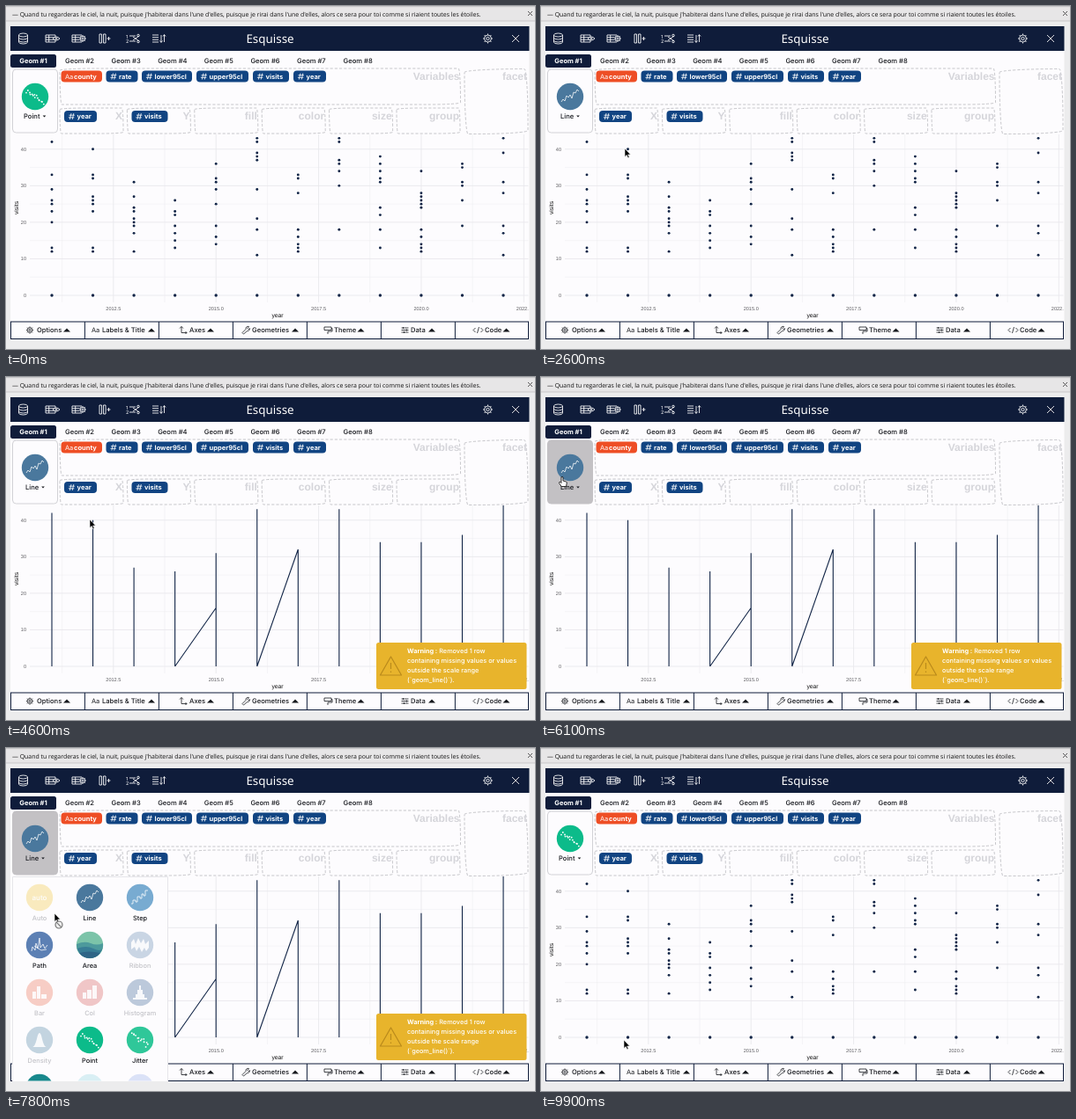
Animation, 600 px wide and 390 px high, one loop 10 s. Source, as an HTML page:

```html
<!DOCTYPE html>
<html lang="fr">
<head>
<meta charset="utf-8">
<title>Esquisse</title>
<style>
  html, body { margin: 0; width: 100%; height: 100%; overflow: hidden; background: #ececec; }
  svg { display: block; width: 600px; height: 390px; font-family: Inter, "Open Sans", sans-serif; }
  .plot { font-family: "Liberation Sans", Arial, sans-serif; }
</style>
</head>
<body>
<svg id="stage" viewBox="0 0 600 390" text-rendering="geometricPrecision"></svg>
<script>
const NAVY = '#0f1c3a', INK = '#112446';
const stage = document.getElementById('stage');

const text = (x, y, s, size = 7.6, attrs = '') => `<text x="${x}" y="${y}" font-size="${size}" ${attrs}>${s}</text>`;
const rect = (x, y, w, h, attrs) => `<rect x="${x}" y="${y}" width="${w}" height="${h}" ${attrs}/>`;
const path = (d, attrs = '') => `<path d="${d}" ${attrs}/>`;
const circle = (x, y, r, attrs = '') => `<circle cx="${x}" cy="${y}" r="${r}" ${attrs}/>`;
const group = (content, attrs = '') => `<g ${attrs}>${content}</g>`;
const at = (x, y, content, attrs = '') => group(content, `transform="translate(${x} ${y})" ${attrs}`);
const range = (n, f) => Array.from({ length: n }, (_, i) => f(i)).join('');

// Window frame
function windowFrame() {
  return rect(0, 0, 600, 390, 'fill="#ececed"') +
    rect(0, 0, 600, 17, 'fill="#e7e6e7"') +
    rect(0, 0, 600, 1.2, 'fill="#c5c5c8"') +
    rect(0, 16.5, 600, 1, 'fill="#c9c8ca"') +
    text(7, 11.6, "— Quand tu regarderas le ciel, la nuit, puisque j'habiterai dans l'une d'elles, puisque je rirai dans l'une d'elles, alors ce sera pour toi comme si riaient toutes les étoiles.",
      6.93, 'fill="#111" font-family="Open Sans, sans-serif"') +
    path('M592 6l5 5m0-5l-5 5', 'stroke="#555" stroke-width="1"') +
    rect(5, 23, 588.5, 356, 'fill="#fdfcfe"');
}

// Header
const gear = r => circle(0, 0, r * .72) + circle(0, 0, r * .3) +
  range(8, i => path(`M0 ${-r * .72}V${-r}`, `transform="rotate(${i * 45})"`));
const table = path('M-7-4H4V4H-7ZM-7-1.3H4M-7 1.3H4M-3.3-4V4');

function header() {
  const icons = [
    [19.5, path('M-5-4A5 2 0 0 1 5-4V4A5 2 0 0 1-5 4ZM-5-4A5 2 0 0 0 5-4M-5-1A5 2 0 0 0 5-1M-5 2A5 2 0 0 0 5 2')],
    [52, table + path('M1 0Q5-4 9 0Q5 4 1 0Z', `fill="${NAVY}"`) + circle(5, 0, 1)],
    [82, table + at(5, 0, circle(0, 0, 3.6, `fill="${NAVY}" stroke="none"`) + gear(3.8))],
    [111, path('M-5-5H-2.5V5H-5ZM-.5-5H2V5H-.5ZM3.5 0H7.5M5.5-2V2')],
    [144, text(-8, -.5, '1', 5.5, 'fill="#fff" stroke="none"') + text(-8, 5, '2', 5.5, 'fill="#fff" stroke="none"') +
      path('M-4-3H3M-4 3H3M0-2L7 3M0 2L7-3') + circle(6, -3.5, 1.3) + circle(6, 3.5, 1.3)],
    [173, path('M-7-4H0M-7-1.3H0M-7 1.3H0M-7 4H0M3-4V4M1.5 2.5L3 4.5 4.5 2.5M6.5 4V-4M5-2.5L6.5-4.5 8-2.5')],
    [546.5, gear(5.5)],
    [578, path('M-4-4L4 4M4-4L-4 4')]
  ];
  return rect(5, 23, 588.5, 28, `fill="${NAVY}"`) +
    group(icons.map(([x, art]) => at(x, 37, art)).join(''), 'fill="none" stroke="#fff" stroke-width=".85"') +
    text(299.5, 42, 'Esquisse', 13.4, 'fill="#fff" text-anchor="middle" font-family="Noto Sans, sans-serif"');
}

function tabs() {
  return rect(5, 55, 52, 15, `rx="2.5" fill="${NAVY}"`) +
    text(31, 65.2, 'Geom #1', 7.5, 'fill="#fff" font-weight="700" text-anchor="middle"') +
    range(7, i => text(67 + i * 52.6, 65.2, `Geom #${i + 2}`, 7.6, 'fill="#16181d" font-weight="500"'));
}

// Drop zones with a hand-drawn outline
function zone(x, y, w, h, label) {
  const k = Math.min(w, h) / 270, a = 255 * k, b = 15 * k, c = 225 * k;
  const d = `M${x} ${y + b}A${a} ${b} 0 0 1 ${x + a} ${y}H${x + w - b}A${b} ${c} 0 0 1 ${x + w} ${y + c}` +
    `V${y + h - b}A${c} ${b} 0 0 1 ${x + w - c} ${y + h}H${x + b}A${b} ${a} 0 0 1 ${x} ${y + h - a}Z`;
  return path(d, 'fill="none" stroke="#c6c6ca" stroke-width="1" stroke-dasharray="3.2 2"') +
    text(x + w - 1, y + 12.6, label, 12, 'fill="#d5d5da" font-weight="700" text-anchor="end" font-family="Liberation Sans, sans-serif"');
}

function chip(x, y, w, label, isText) {
  const mark = isText ? text(x + 4.5, y + 9.2, 'Aa', 7.4, 'fill="#fff"') :
    path(`M${x + 8} ${y + 3}l-1.6 7m4.4-7l-1.6 7m-3.7-4.8h6.4m-7 2.6h6.4`, 'stroke="#fff" stroke-width=".8" fill="none"');
  return rect(x, y, w, 13, `rx="4" fill="${isText ? '#ee4e25' : '#114482'}"`) + mark +
    text(x + 14.6, y + 9.2, label, 7.5, 'fill="#fff" font-weight="700"');
}

function dropZones() {
  const slots = ['X', 'Y', 'fill', 'color', 'size', 'group'];
  return zone(61, 71, 454.5, 41, 'Variables') + zone(520, 71.5, 72, 74, 'facet') +
    slots.map((s, i) => zone(61 + i * 76.4, 116, 72, 29, s)).join('') +
    chip(62.5, 73.5, 46.5, 'county', true) + chip(113.5, 73.5, 36, 'rate') + chip(154, 73.5, 57, 'lower95cl') +
    chip(216, 73.5, 59, 'upper95cl') + chip(280, 73.5, 41, 'visits') + chip(326, 73.5, 37, 'year') +
    chip(66, 119, 37, 'year') + chip(142.5, 119, 41, 'visits');
}

// Chart
const px = year => 52 + (year - 2011) * 46.55;
const py = visits => 329 - visits * 4.155;
const visitsByYear = [
  '42 33 29 26 25 23 20 13 12', '40 33 32 27 26 25 23 13 12', '31 27 24 23 21 20 19 17 12',
  '26 23 22 19 17 15 13', '36 32 31 29 25 19 16 14', '43 42 39 38 37 29 21 18 11',
  '33 32 28 18 16 14 13 12', '43 42 37 36 34 30 18', '38 36 34 32 31 24 22 18 13',
  '34 28 27 26 25 24 18 16 14 13 12', '36 35 31 30 26 19', '43 39 31 28 19 17 11'
];
const lineTops = [42, 40, 27, 26, 31, 43, 32, 43, 34, 34, 36, 45];

function axes() {
  const vertical = (x, w) => path(`M${x} 146V337`, `stroke-width="${w}"`);
  const horizontal = (y, w) => path(`M27 ${y}H592.5`, `stroke-width="${w}"`);
  const grid = range(5, i => vertical(px(2012.5 + 2.5 * i), .9) + vertical(px(2011.25 + 2.5 * i), .45)) +
    range(5, i => horizontal(py(i * 10), .9) + (i < 4 ? horizontal(py(i * 10 + 5), .45) : ''));
  return group(grid, 'stroke="#e9e8ec"') +
    range(5, i => text(23, py(i * 10) + 2, i * 10, 5.6, 'fill="#5c5c60" text-anchor="end"')) +
    range(5, i => text(px(2012.5 + 2.5 * i), 345.8, (2012.5 + 2.5 * i).toFixed(1), 5.6, 'fill="#5c5c60" text-anchor="middle"')) +
    text(308, 353.8, 'year', 6.8, 'fill="#111" text-anchor="middle"') +
    text(0, 0, 'visits', 6.8, 'fill="#111" text-anchor="middle" transform="translate(14 229.5) rotate(-90)"');
}

const points = () => visitsByYear.map((row, i) =>
  row.split(' ').map(v => circle(px(2011 + i), py(v), 1.45)).join('') + circle(px(2011 + i), py(0), 1.7)).join('');

const lines = () => path(
  lineTops.map((top, i) => `M${px(2011 + i)} ${py(0)}V${py(top)}`).join('') +
  `M${px(2014)} ${py(0)}L${px(2015)} ${py(16)}M${px(2016)} ${py(0)}L${px(2017)} ${py(32)}`,
  `fill="none" stroke="${INK}" stroke-width="1.1"`);

// Bottom bar
function bottomBar() {
  const buttons = [
    [27, 35, 69, 'Options', gear(4)],
    [102, 109, 165, 'Labels &amp; Title', text(-5, 2.6, 'Aa', 7.4, 'fill="#16181d" stroke="none"')],
    [201, 208, 232, 'Axes', path('M-2-4V3H4M-4-2L-2-4 0-2M2.5 1.5L4 3 2.5 4.5')],
    [272, 279, 328, 'Geometries', path('M-4 3L0-1A2.6 2.6 0 0 1 3.5-4L2-2 3.2-.8 4.5-2A2.6 2.6 0 0 1 1.5 1L-2.5 4.5Z')],
    [365, 372, 402.5, 'Theme', path('M-4-3.5H4V0H-4ZM4-2H5V1.5H0V4.5')],
    [452.5, 459, 483, 'Data', path('M-4-2.5H4M-4 0H4M-4 2.5H4M-2-3.5V-1.5M2-1V1M-1 1.5V3.5')],
    [535.5, 543, 567.5, 'Code', path('M-3-2.5L-5.5 0-3 2.5M3-2.5L5.5 0 3 2.5M1-3.5L-1 3.5')]
  ];
  return rect(5.5, 359, 587, 19.5, `fill="#fdfcfe" stroke="${NAVY}"`) +
    range(6, i => path(`M${89.4 + i * 84} 359V378.5`, `stroke="${NAVY}"`)) +
    buttons.map(([icon, label, caret, name, art]) =>
      at(icon, 368.5, art, 'fill="none" stroke="#16181d" stroke-width=".8"') +
      text(label, 371.2, name, 7.6, 'fill="#16181d" font-weight="500"') +
      path(`M${caret - 4} 370.5l4-4 4 4Z`, 'fill="#16181d"')).join('');
}

// Geom icons, drawn around their centre
let seed = 7;
const random = () => (seed = seed * 16807 % 2147483647) / 2147483647;
const stroke = d => path(d, 'fill="none" stroke="#fff" stroke-width=".9" opacity=".85"');
const solid = d => path(d, 'fill="#fff" opacity=".9"');
const scatter = (n, spread) => range(n, i => {
  const u = i / (n - 1) * 2 - 1;
  return circle(u * 9 + (random() - .5) * 2, u * 6.5 + (random() - .5) * spread, .9, 'fill="#fff"');
});
const bell = solid('M-8 8C-3 7-3-8 0-8S3 7 8 8Z');
const zigzag = 'M-10 6L-8 3-6 5-4-1-2 1 0-2 2 2 4-5 6-4 8-8 10-6';
const geoms = [
  ['Auto', '#f3cd4e', text(0, 2.6, 'auto', 8, 'fill="#fff" text-anchor="middle" font-weight="500"'), false],
  ['Line', '#4a789d', stroke(zigzag), true],
  ['Step', '#78abd1', stroke('M-10 7H-8V3H-5V5H-3V-1H0V1H2V-4H4V-2H6V-8H9'), true],
  ['Path', '#5c80b4', stroke('M-9 7L-8 2-5 6-4-2-2 4 0-8 1 3 4-1 6 4 9 0M-6 1L2 6 8 5'), true],
  ['Area', '#7cc4a9', path('M-15-1Q-6-5 1-2T14.9-2A15 15 0 0 1-14.9 2Z', 'fill="#4d9a9c"') +
    path('M-14.5 4Q-4 0 4 4T14.3 4A15 15 0 0 1-14.3 4Z', 'fill="#387d95"') +
    path('M-12 9Q-2 6 12 9A15 15 0 0 1-12 9Z', 'fill="#2f6586"'), true],
  ['Ribbon', '#6f91b8', solid('M-10-3L-7-7-5-1-2-8 1-2 4-7 6-1 10-5V3L7 7 5 3 2 8-1 2-4 7-6 2-10 5Z'), false],
  ['Bar', '#ee7d62', solid('M-8 7V-1H-4V7ZM-3 7V-7H1V7ZM2 7V2H8V7Z'), false],
  ['Col', '#da6a67', solid('M-8 7V0H-4V7ZM-3 7V-3H2V7ZM3 7V-8H8V7Z'), false],
  ['Histogram', '#4b719f', solid('M-8 8V6H-5V2H-3V-3H-1V-8H1V-3H3V2H5V6H8V8Z'), false],
  ['Density', '#5f8fae', bell, false],
  ['Point', '#0cbb8a', scatter(15, 5), true],
  ['Jitter', '#2fc799', scatter(14, 8), true],
  ['', '#18888c', '', true],
  ['', '#d9eff4', '', true],
  ['', '#dbe2f7', '', true]
];
const icon = ([, color, art]) => circle(0, 0, 15.2, `fill="${color}"`) + art;
const geomNamed = name => geoms.find(g => g[0] === name);

function menu() {
  const cells = geoms.map((g, i) => {
    const x = 38 + i % 3 * 57, y = 170 + Math.floor(i / 3) * 54;
    return at(x, y, icon(g), g[3] ? '' : 'opacity=".36"') +
      text(x, y + 26.2, g[0], 7.4, `text-anchor="middle" font-weight="500" fill="${g[3] ? '#16181d' : '#c3c3c8'}"`);
  }).join('');
  return rect(7, 146, 177, 233, 'fill="#fdfcfe"') +
    path('M7.5 379V146.5H183.5V379', 'fill="none" stroke="#e6e6ea"') + group(cells, 'clip-path="url(#menuClip)"');
}

const geomButton = (name, labelX, caretX) => at(33, 103, icon(geomNamed(name))) +
  text(labelX, 127.8, name, 7.6, 'fill="#16181d" font-weight="500"') +
  path(`M${caretX - 1.8} 124.4h3.6l-1.8 2Z`, 'fill="#16181d"');

function warning() {
  const rows = ['containing missing values or values', 'outside the scale range', '(`geom_line()`).'];
  return rect(420, 302, 170.5, 53, 'rx="2.5" fill="#e8b42c"') +
    path('M436.500 318L448.500 339H424.500ZM436.500 325V332M436.500 334.500V336', 'fill="none" stroke="#b98a1c" stroke-width="1.2" stroke-linejoin="round"') +
    group(text(455, 314.4, '<tspan font-weight="700">Warning :</tspan> Removed 1 row', 7.3) +
      rows.map((r, i) => text(455, 325.4 + i * 11, r, 7.3)).join(''), 'fill="#fff" font-weight="500"');
}

const arrow = path('M0 0V9.500L2.200 7.500 3.700 10.800 5.200 10.100 3.700 7H6.600Z', 'fill="#000" stroke="#fff" stroke-width=".6"');
const hand = path('M-1 0Q0-1.200 1 0V4L4.500 5Q5.500 5.500 5.200 7L4.500 10.500H-.8L-3.500 6.500Q-3.500 5-2 5.500L-1 6.500Z',
  'fill="#fff" stroke="#000" stroke-width=".8" stroke-linejoin="round"');
const forbidden = circle(5, 13, 4, 'fill="#eee" stroke="#777" stroke-width="1.200"') + path('M2.200 10.200l5.600 5.600', 'stroke="#777" stroke-width="1.200"');

stage.innerHTML =
  `<defs><clipPath id="panel">${rect(27, 146, 566, 192, '')}</clipPath>` +
  `<clipPath id="app">${rect(5, 23, 588, 356, '')}</clipPath>` +
  `<clipPath id="menuClip">${rect(7, 146, 177, 232.5, '')}</clipPath></defs>` +
  windowFrame() + header() + tabs() + dropZones() +
  group(axes(), 'class="plot" clip-path="url(#app)"') +
  group(points(), `id="points" fill="${INK}" clip-path="url(#panel)"`) +
  group(lines(), 'id="lines" clip-path="url(#panel)"') +
  bottomBar() +
  rect(7.5, 72, 51, 72, 'id="button" rx="4"') +
  group(geomButton('Point', 20, 43.5), 'id="pointButton"') +
  group(geomButton('Line', 22, 42), 'id="lineButton"') +
  group(menu(), 'id="menu"') + group(warning(), 'id="warning"') +
  group(group(arrow, 'id="arrow"') + group(hand, 'id="hand"') + group(forbidden, 'id="forbidden"'), 'id="cursor"');

// Motion
const LOOP = 10000;
const el = Object.fromEntries([...stage.querySelectorAll('[id]')].map(node => [node.id, node]));
const show = (node, on) => node.setAttribute('visibility', on ? 'inherit' : 'hidden');
const within = (t, a, b) => t >= a && t < b;
const clamp = v => Math.max(0, Math.min(1, v));
const cursorStops = [
  [400, 72, 215], [900, 37, 108], [1600, 37, 108], [2200, 95, 162], [5300, 95, 162], [5900, 24, 114],
  [6500, 24, 114], [7200, 55, 188], [7900, 55, 188], [8300, 95, 333], [10000, 94, 332]
];

function cursorAt(t) {
  const i = cursorStops.findIndex(stop => stop[0] > t);
  if (i < 1) return cursorStops[0].slice(1);
  const [t0, x0, y0] = cursorStops[i - 1], [t1, x1, y1] = cursorStops[i];
  const u = (t - t0) / (t1 - t0), e = u * u * (3 - 2 * u);
  return [x0 + (x1 - x0) * e, y0 + (y1 - y0) * e];
}

function geomUnder(x, y) {
  const column = Math.round((x - 38) / 57), row = Math.round((y - 175) / 54);
  return column >= 0 && column < 3 && row >= 0 ? geoms[row * 3 + column] : null;
}

function update(t) {
  const [x, y] = cursorAt(t);
  const menuOpen = within(t, 1200, 2500) || within(t, 6300, 9000);
  const lineChart = within(t, 2800, 9300), lineChosen = within(t, 2500, 9000);
  const visible = t >= 400;
  const overButton = visible && x > 7 && x < 59 && y > 72 && y < 145;
  const overGeom = menuOpen && !overButton ? geomUnder(x, y) : null;
  const pointing = overButton || Boolean(overGeom && overGeom[3]);

  show(el.points, !lineChart);
  show(el.lines, lineChart);
  show(el.pointButton, !lineChosen);
  show(el.lineButton, lineChosen);
  show(el.menu, menuOpen);
  const active = menuOpen || overButton;
  el.button.setAttribute('fill', active ? '#c3c1c4' : '#fdfcfe');
  el.button.setAttribute('stroke', active ? '#c3c1c4' : '#d2d2d6');
  el.warning.setAttribute('opacity', Math.min(clamp((t - 3000) / 300), clamp((8250 - t) / 300)));

  show(el.cursor, visible);
  el.cursor.setAttribute('transform', `translate(${x} ${y})`);
  show(el.hand, pointing);
  show(el.arrow, !pointing);
  show(el.forbidden, Boolean(overGeom && !overGeom[3]));
}

function frame() {
  update(performance.now() % LOOP);
  requestAnimationFrame(frame);
}
frame();
</script>
</body>
</html>
```
